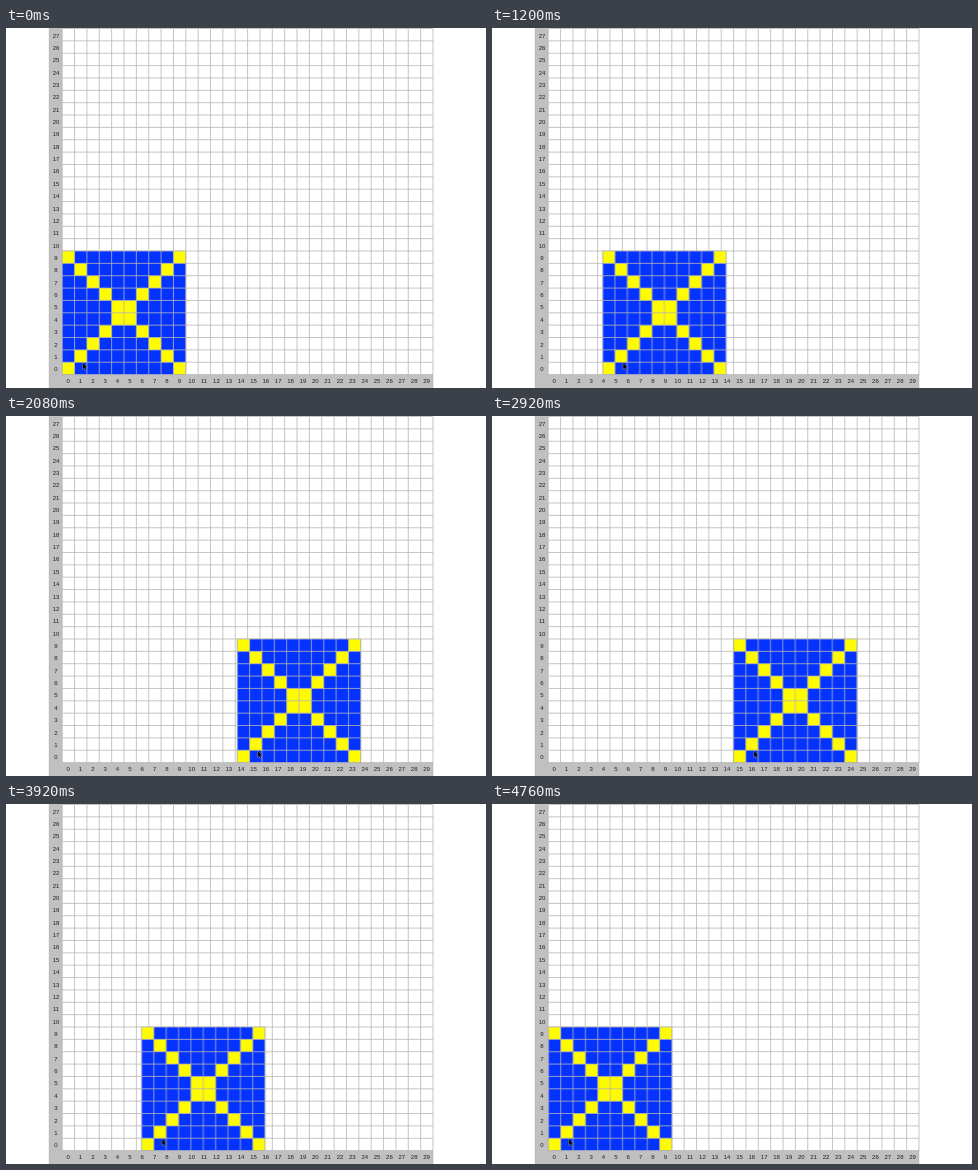
Write an HTML page that moves like this. It is 480 px wide and 360 px high and loops after 4800 ms.

```html
<!DOCTYPE html>
<html lang="en">
<head>
<meta charset="utf-8">
<title>Sliding tile on a grid</title>
<style>
  html, body { margin: 0; width: 100%; height: 100%; overflow: hidden; background: #fff; }
  svg { display: block; }
  text {
    font: 6px "Liberation Sans", Arial, sans-serif;
    fill: #1c1c1c;
    text-anchor: middle;
  }
  .line { fill: none; stroke: #b6b6b6; stroke-width: .8; }
  #tile { animation: slide 4800ms ease-in-out infinite; }
  @keyframes slide {
    0%, 10% { transform: translateX(0); }
    50%, 60% { transform: translateX(185.4px); }
    100% { transform: translateX(0); }
  }
</style>
</head>
<body>
<svg width="480" height="360" viewBox="0 0 480 360">
  <path fill="#c0c0c0" d="M43 0H56.2V346.6H427V360H43Z"/>
  <path class="line" d="M43.3 0V360M426.8 346V360"/>
  <path id="grid" class="line"/>
  <g id="labels"></g>
  <g id="tile">
    <rect x="56.2" y="223" width="123.6" height="123.6" fill="#0433ff"/>
    <path id="cross" fill="#fffb00"/>
    <path id="tileGrid" class="line"/>
    <path d="M76.7 334.6V341.2L78.2 339.9L79.2 342.1L80.2 341.7L79.2 339.5H81.1Z"
          fill="#000" stroke="#d8d8d8" stroke-width=".6" paint-order="stroke"/>
  </g>
</svg>
<script>
  const CELL = 12.36, LEFT = 56.2, BOTTOM = 346.6;
  const COLS = 30, ROWS = 28, SIZE = 10;
  const $ = id => document.getElementById(id);
  const colX = c => LEFT + c * CELL;
  const rowY = r => BOTTOM - r * CELL;

  function gridPath(cols, rows) {
    let d = '';
    for (let c = 0; c <= cols; c++) d += `M${colX(c)} ${BOTTOM}V${rowY(rows)}`;
    for (let r = 0; r <= rows; r++) d += `M${LEFT} ${rowY(r)}H${colX(cols)}`;
    return d;
  }

  const cell = (c, r) => `M${colX(c)} ${rowY(r)}h${CELL}v${-CELL}h${-CELL}Z`;

  function label(value, x, y) {
    const text = document.createElementNS('http://www.w3.org/2000/svg', 'text');
    text.setAttribute('x', x);
    text.setAttribute('y', y);
    text.textContent = value;
    $('labels').append(text);
  }

  $('grid').setAttribute('d', gridPath(COLS, ROWS));
  $('tileGrid').setAttribute('d', gridPath(SIZE, SIZE));

  let cross = '';
  for (let i = 0; i < SIZE; i++) cross += cell(i, i) + cell(i, SIZE - 1 - i);
  $('cross').setAttribute('d', cross);

  for (let c = 0; c < COLS; c++) label(c, colX(c + .5) - .3, 355.2);
  for (let r = 0; r < ROWS; r++) label(r, 50, rowY(r + .5) + 2.8);
</script>
</body>
</html>
```
